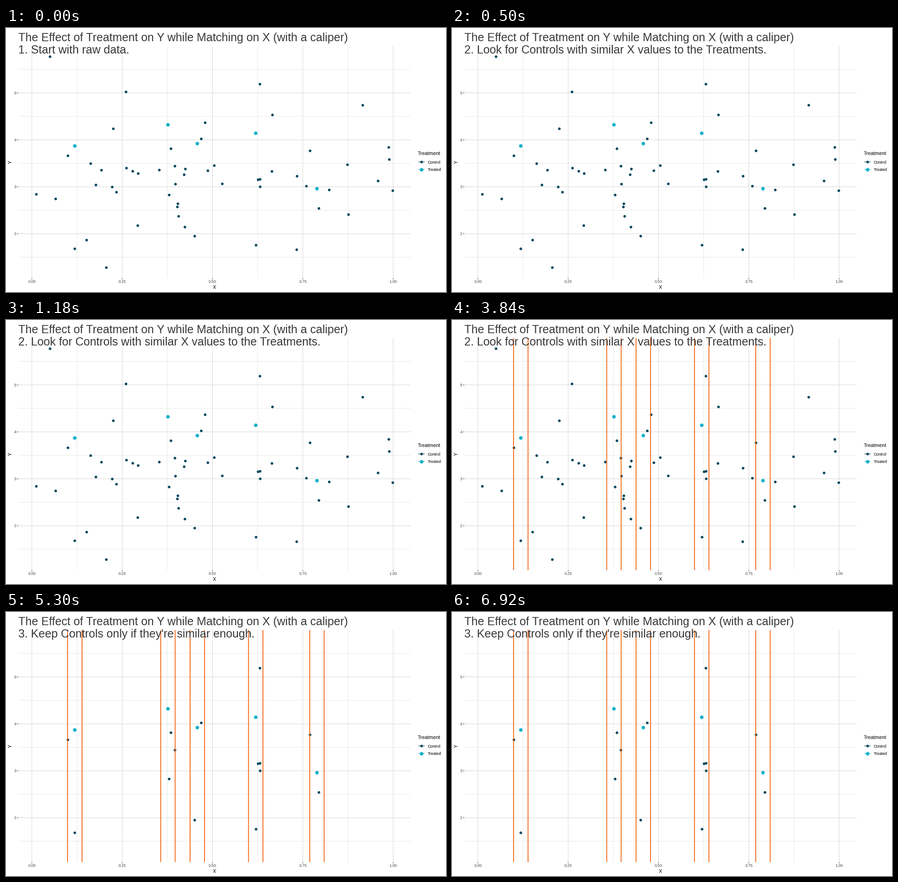
These frames come from a looping animation (966x580 px, 8 s). A matplotlib script:

```python
import matplotlib.pyplot as plt
import numpy as np
from matplotlib.animation import FuncAnimation
from matplotlib.collections import LineCollection

W, H = 966, 580
DPI = 100
PT = 72 / DPI  # points per pixel
STEP, LOOP = 20, 8000

LEFT, RIGHT, TOP, BOTTOM = 27, 888.3, 39.6, 549.5
DARK, TEAL, ORANGE = "#06495e", "#15b1c9", "#f2600c"
INK, TICK_INK = "#383838", "#4d4d4d"

TITLE = "The Effect of Treatment on Y while Matching on X (with a caliper)"
STEPS = [
    (0, "1. Start with raw data."),
    (500, "2. Look for Controls with similar X values to the Treatments."),
    (5300, "3. Keep Controls only if they're similar enough."),
]
CALIPER_START, FILTER_START = 1640, 5300

CALIPER = 0.02
TREATED = np.array([(0.1188, 3.87), (0.3766, 4.32), (0.4579, 3.92),
                    (0.6196, 4.14), (0.7891, 2.96)])
# Controls near a treated point, then the outermost ones
KEY_CONTROLS = [
    (0.0998, 3.66), (0.1188, 1.68), (0.385, 3.81), (0.396, 3.44), (0.38, 2.825),
    (0.4689, 4.02), (0.4507, 1.95), (0.6312, 5.185), (0.6262, 3.15),
    (0.6317, 3.16), (0.632, 3.0), (0.6205, 1.757), (0.77, 3.766), (0.7945, 2.54),
    (0.0503, 5.77), (0.2061, 1.28), (0.2606, 5.02), (0.666, 4.53),
    (0.999, 2.917), (0.0124, 2.84),
]
N_CONTROLS = 55


def px(x):
    return 56.8 + 793.2 * x


def py(y):
    return 142.5 + 103.2 * (5 - y)


def is_matched(x):
    return (np.abs(x[:, None] - TREATED[:, 0]) <= CALIPER).any(axis=1)


def make_controls():
    """Key points plus seeded ones that all fall outside the calipers."""
    rng = np.random.default_rng(8)
    n = N_CONTROLS - len(KEY_CONTROLS)
    x = rng.uniform(0.05, 1, 4 * n)
    y = rng.normal(3.15, 0.75, 4 * n)
    keep = ~is_matched(x) & (np.abs(y - 3.15) < 1.6)
    return np.vstack([KEY_CONTROLS, np.column_stack([x, y])[keep][:n]])


plt.rcParams["font.family"] = "Liberation Sans"
fig = plt.figure(figsize=(W / DPI, H / DPI), dpi=DPI, facecolor="white")
ax = fig.add_axes([0, 0, 1, 1])
ax.set_xlim(0, W)
ax.set_ylim(H, 0)
ax.axis("off")


def segments(segs, color, width, z):
    lines = LineCollection(segs, colors=color, linewidths=width * PT,
                           zorder=z, capstyle="butt")
    lines.set_snap(False)
    return ax.add_collection(lines, autolim=False)


def dots(x, y, color, diameter, z=3):
    # One size per dot keeps positions from being rounded to whole pixels
    sizes = np.full(len(x), (diameter * PT) ** 2)
    return ax.scatter(x, y, s=sizes, c=color, linewidths=0, zorder=z)


def label(x, y, text, size, color="black", ha="left", **kw):
    kw.setdefault("va", "baseline")
    return ax.text(x, y, text, fontsize=size * PT, color=color, ha=ha, zorder=6, **kw)


def vertical(xs, y0=TOP, y1=BOTTOM):
    return [[(x, y0), (x, y1)] for x in xs]


def horizontal(ys, x0=LEFT, x1=RIGHT):
    return [[(x0, y), (x1, y)] for y in ys]


# Grid, ticks and axis text
x_major = np.arange(5) / 4
y_major = np.arange(2, 6)
segments(vertical(px(x_major[:-1] + 0.125)) + horizontal(py(np.arange(5) + 1.5)),
         "#e8e8e8", 1, 1)
segments(vertical(px(x_major)) + horizontal(py(y_major)), "#d5d5d5", 1, 2)
segments(vertical(px(x_major), BOTTOM, BOTTOM + 2.8)
         + horizontal(py(y_major), LEFT - 2.8, LEFT), "#333333", 1, 2)
for v in x_major:
    label(px(v), 560.3, f"{v:.2f}", 8.8, TICK_INK, "center")
for v in y_major:
    label(22.2, py(v) + 3.2, str(v), 8.8, TICK_INK, "right")
label(457.6, 573, "X", 11, ha="center")
label(9.3, 294.4, "Y", 11, ha="center", va="center", rotation=90)

# Legend
label(903.7, 279, "Treatment", 11)
for y, name, color, size in [(294.2, "Control", DARK, 5.8), (310.5, "Treated", TEAL, 7.8)]:
    segments(horizontal([y], 905.3, 919), color, 1.1, 3)
    dots([912.2], [y], color, size)
    label(925.8, y + 3.3, name, 8.8)

# Data
controls = make_controls()
cx, cy = px(controls[:, 0]), py(controls[:, 1])
matched = is_matched(controls[:, 0])
dots(cx[matched], cy[matched], DARK, 5.8)
unmatched = dots(cx[~matched], cy[~matched], DARK, 5.8)
dots(px(TREATED[:, 0]), py(TREATED[:, 1]), TEAL, 7.8, 4)
bounds = px(np.add.outer(TREATED[:, 0], [-CALIPER, CALIPER]).ravel())
calipers = segments(vertical(bounds), ORANGE, 1.8, 5)

label(27, 29, TITLE, 25.1, INK)
subtitle = label(27, 56, "", 25.1, INK)


def update(i):
    t = i * STEP
    subtitle.set_text([text for start, text in STEPS if t >= start][-1])
    calipers.set_visible(t >= CALIPER_START)
    unmatched.set_visible(t < FILTER_START)
    return subtitle, calipers, unmatched


anim = FuncAnimation(fig, update, frames=LOOP // STEP, interval=STEP,
                     repeat=True, repeat_delay=0, blit=False)
plt.show()
```
